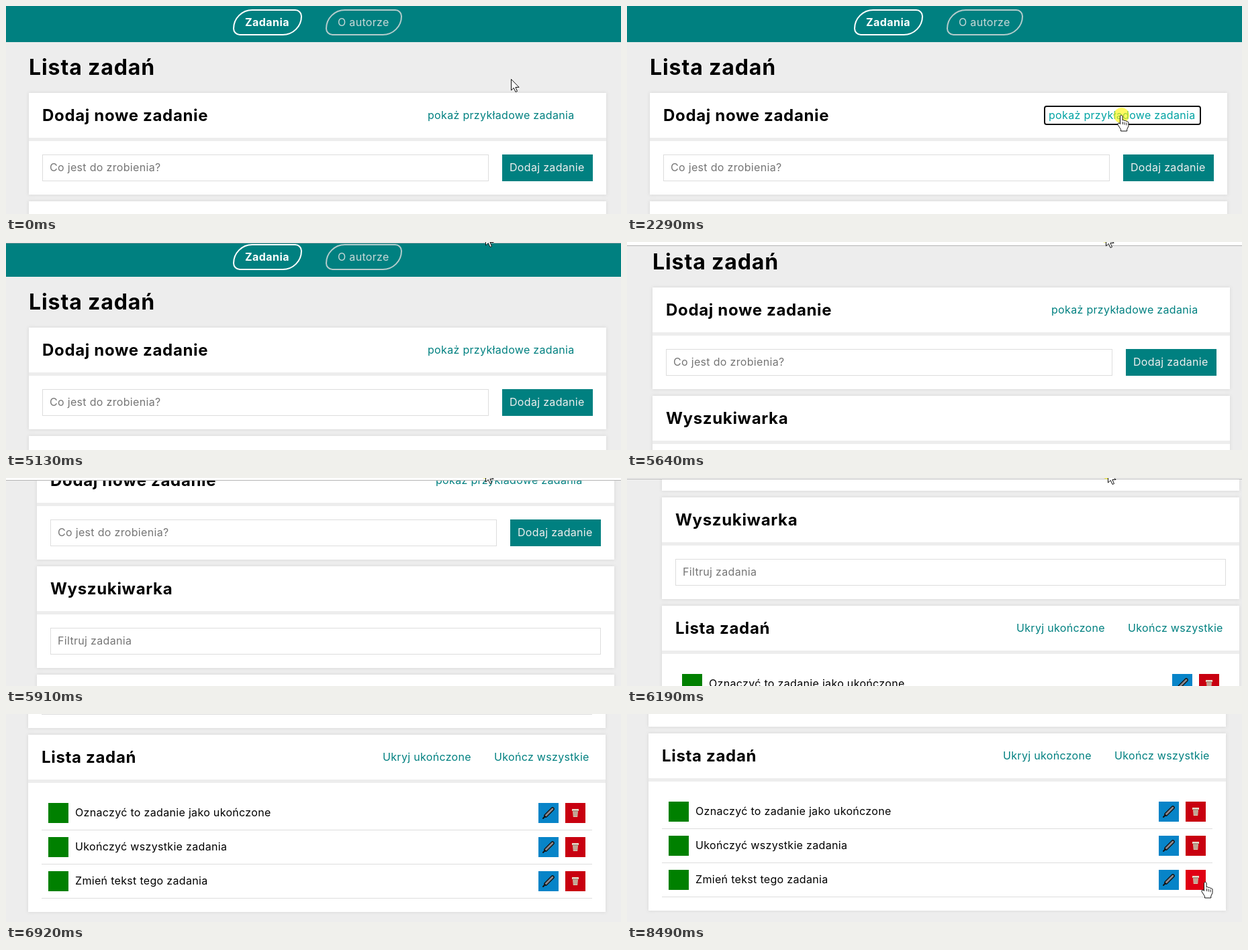
An HTML page with a canvas for the animation above (8.56 s loop, 916 px wide and 311 px high).

```html
<!DOCTYPE html>
<html lang="pl">
<head>
<meta charset="utf-8">
<title>Lista zadań</title>
<style>
  html, body { margin: 0; width: 100%; height: 100%; overflow: hidden; background: #eee; }
  canvas { display: block; }
</style>
</head>
<body>
<canvas id="stage" width="916" height="311"></canvas>
<script>
const ctx = document.getElementById('stage').getContext('2d');
const W = 916, H = 311, LOOP = 8560;
const TEAL = '#008080', BG = '#ededed';

// Recorder activity: [start, end, number of steps]
const BURSTS = [
  [390, 680, 5], [2290, 3120, 12], [3190, 4030, 13], [4100, 4850, 12],
  [5130, 5980, 13], [6040, 6850, 13], [6920, 6920, 1], [7260, 7260, 1], [7860, 8490, 9]
];
// Pointer hotspot: [time, x, y]
const POINTER = [
  [320, 752, 109], [680, 736, 163], [2480, 736, 163], [2800, 734, 112],
  [3120, 730, 42], [3400, 722, 6], [3890, 718, -12], [4850, 716, -14],
  [5130, 714, -12], [5640, 713, -11], [6190, 716, -10], [6520, 716, -13],
  [6850, 716, -14], [6920, 716, -30], [7790, 723, -24], [7860, 726, -8],
  [8050, 752, 60], [8250, 805, 165], [8420, 858, 247], [8490, 861, 251]
];
// Captured region: [time, horizontal shift, scroll, height of the top strip]
const VIEW = [
  [5060, 0, 0, 0], [5200, 0, 4, 4], [5640, 4, 64, 6], [5980, 14, 185, 4],
  [6190, 18, 269, 2], [6520, -1, 379, 3], [6850, -1, 420, 2],
  [6920, -1, 423, 0], [7190, -1, 423, 0], [7260, -2, 425, 0]
];
const TASKS = ['Oznaczyć to zadanie jako ukończone', 'Ukończyć wszystkie zadania', 'Zmień tekst tego zadania'];

function snap(t) {
  let out = 0;
  for (const [start, end, n] of BURSTS) {
    if (t < start) break;
    const dt = n > 1 ? (end - start) / (n - 1) : 0;
    const k = dt ? Math.min(n - 1, Math.floor((t - start) / dt + 1e-6)) : 0;
    out = start + k * dt;
  }
  return out;
}

function sample(keys, t) {
  if (t <= keys[0][0]) return keys[0].slice(1);
  const i = keys.findIndex(k => k[0] > t);
  if (i < 0) return keys[keys.length - 1].slice(1);
  const a = keys[i - 1], b = keys[i], f = (t - a[0]) / (b[0] - a[0]);
  return a.slice(1).map((v, j) => v + (b[j + 1] - v) * f);
}

function rect(x, y, w, h, color) {
  ctx.fillStyle = color;
  ctx.fillRect(x, y, w, h);
}

function text(s, x, y, color = '#000', size = 16, weight = 400) {
  ctx.font = `${weight} ${size}px Inter, sans-serif`;
  ctx.letterSpacing = size * (weight > 400 ? 0.028 : 0.02) + 'px';
  ctx.fillStyle = color;
  ctx.fillText(s, x, y);
}

function roundBox(x, y, w, h, radii, color) {
  ctx.beginPath();
  ctx.roundRect(x + 1, y + 1, w - 2, h - 2, radii);
  ctx.strokeStyle = color;
  ctx.lineWidth = 2;
  ctx.stroke();
}

function panel(y, h, title) {
  ctx.save();
  ctx.shadowColor = '#d4d4d4';
  ctx.shadowBlur = 5;
  rect(34, y, 860, h, '#fff');
  ctx.restore();
  rect(34, y + 67, 860, 5, BG);
  text(title, 54, y + 42, '#000', 24, 700);
}

function field(y, w, hint) {
  ctx.strokeStyle = '#ddd';
  ctx.lineWidth = 1;
  ctx.strokeRect(54.5, y + 0.5, w - 1, 39);
  text(hint, 65, y + 25, '#757575');
}

function pencil(x, y) {
  ctx.lineCap = 'round';
  for (const [color, width] of [['#111', 5.5], ['#8b8990', 2.8]]) {
    ctx.strokeStyle = color;
    ctx.lineWidth = width;
    ctx.beginPath();
    ctx.moveTo(x - 4, y + 4);
    ctx.lineTo(x + 6, y - 6);
    ctx.stroke();
  }
  ctx.strokeStyle = '#111';
  ctx.lineWidth = 2;
  ctx.beginPath();
  ctx.moveTo(x - 8, y + 8);
  ctx.lineTo(x - 5, y + 5);
  ctx.stroke();
  ctx.lineCap = 'butt';
}

function bin(x, y) {
  ctx.beginPath();
  ctx.moveTo(x - 4, y - 4);
  ctx.lineTo(x + 4, y - 4);
  ctx.lineTo(x + 3.2, y + 6);
  ctx.lineTo(x - 3.2, y + 6);
  ctx.closePath();
  ctx.fillStyle = '#dcc8b4';
  ctx.fill();
  rect(x - 5, y - 6, 10, 3, '#e8dccb');
  rect(x - 4, y - 3.5, 8, 1, '#7c5a50');
  for (const d of [-2, 0, 2]) rect(x + d - 0.4, y - 2, 0.8, 7, '#9a7468');
}

function loader(t) {
  roundBox(730, 149, 125, 29, 3, '#111');
  const xs = [743, 760, 777, 796, 810, 823, 839];
  const pos = (((t - 3890) / 140 + 2) % 7 + 7) % 7;
  const lit = Math.floor(pos + 0.01);
  ctx.textAlign = 'center';
  [...'LOADING'].forEach((ch, i) => {
    const d = i - lit;
    const color = d === 0 ? '#f01018' : d === -1 ? '#0b7148' : d === -2 || d === 1 ? '#76569a' : '#34343f';
    const size = 13 * (1 + 0.85 * Math.exp(-1.1 * d * d));
    ctx.save();
    if (d === 0) {
      ctx.shadowColor = '#ff2020';
      ctx.shadowBlur = 12;
    }
    ctx.font = `900 ${size}px Inter, sans-serif`;
    ctx.letterSpacing = '0px';
    ctx.fillStyle = color;
    ctx.fillText(ch, xs[i], 163 + size * 0.36);
    if (Math.abs(d) < 2 && d < 1) {
      ctx.lineWidth = 0.8;
      ctx.strokeStyle = d ? '#123' : '#801018';
      ctx.strokeText(ch, xs[i], 163 + size * 0.36);
    }
    ctx.restore();
  });
  ctx.textAlign = 'left';
}

function header() {
  rect(-20, -20, W + 40, 74, TEAL);
  roundBox(338, 5, 103, 39, [30, 10, 30, 10], '#fff');
  text('Zadania', 356, 30, '#fff', 16, 700);
  roundBox(476, 5, 114, 39, [30, 10, 30, 10], '#b4cccc');
  text('O autorze', 494, 30, '#c8d8d8');
}

function page(t, over) {
  header();
  text('Lista zadań', 34, 103, '#000', 32, 700);

  panel(130, 152, 'Dodaj nowe zadanie');
  const loading = t >= 2420 && t < 4850;
  if (loading) {
    loader(t);
  } else {
    text('pokaż przykładowe zadania', 628, 169, over(624, 150, 228, 28) ? '#00a3a3' : TEAL);
    if (t >= 2290 && t < 5130) roundBox(621, 149, 234, 29, 3, '#111');
  }
  field(222, 665, 'Co jest do zrobienia?');
  rect(739, 222, 135, 40, TEAL);
  text('Dodaj zadanie', 750, 247, '#eee');

  panel(292, 152, 'Wyszukiwarka');
  field(384, 820, 'Filtruj zadania');

  panel(454, 265, 'Lista zadań');
  text('Ukryj ukończone', 562, 493, TEAL);
  text('Ukończ wszystkie', 728, 493, over(724, 474, 148, 28) ? '#00a3a3' : TEAL);
  TASKS.forEach((task, i) => {
    const y = 556 + 51 * i;
    rect(64, y, 30, 30, '#008000');
    text(task, 104, y + 20);
    rect(794, y, 30, 30, over(794, y, 30, 30) ? '#0a98e4' : '#0784c8');
    pencil(809, y + 15);
    rect(834, y, 30, 30, over(834, y, 30, 30) ? '#e00014' : '#c80010');
    bin(849, y + 15);
    rect(54, y + 40, 820, 1, '#ddd');
  });
}

function arrow() {
  ctx.beginPath();
  [[0, 0], [0, 16.5], [3.8, 13], [6.5, 19], [9, 18], [6.4, 12], [11.6, 12]].forEach(p => ctx.lineTo(...p));
}

function hand() {
  ctx.beginPath();
  ctx.moveTo(-2, 13);
  ctx.lineTo(-2, 1);
  ctx.quadraticCurveTo(-0.2, -1.6, 1.6, 1);
  ctx.lineTo(1.6, 7.5);
  for (const [x, y] of [[4.6, 8], [7.6, 9], [10.5, 10.4]]) {
    ctx.quadraticCurveTo(x - 1.5, y - 1.8, x, y);
  }
  ctx.lineTo(10.5, 16);
  ctx.lineTo(8.2, 21);
  ctx.lineTo(8.2, 23.5);
  ctx.lineTo(-1, 23.5);
  ctx.lineTo(-1, 21);
  ctx.lineTo(-5.5, 14);
  ctx.quadraticCurveTo(-5.6, 10.8, -3.4, 11.4);
}

function pointer(x, y, isHand, pressed) {
  ctx.save();
  ctx.translate(x + 0.5, y + 0.5);
  if (pressed) {
    ctx.beginPath();
    ctx.arc(0, 0, 11.5, 0, 7);
    ctx.fillStyle = 'rgba(255, 245, 0, .62)';
    ctx.fill();
  }
  (isHand ? hand : arrow)();
  ctx.closePath();
  ctx.fillStyle = '#fff';
  ctx.fill();
  ctx.strokeStyle = '#111';
  ctx.lineWidth = 1;
  ctx.stroke();
  if (isHand) {
    for (const d of [2, 4.6, 7.4]) rect(d - 0.4, 9 + d / 4, 0.9, 4, '#111');
  }
  ctx.restore();
}

function draw(now) {
  const t = snap(now);
  const [px, py] = sample(POINTER, t).map(Math.round);
  const [dx, scroll, strip] = sample(VIEW, t).map(Math.round);
  let isHand = false;
  const over = (x, y, w, h) => {
    const ox = px - dx - x, oy = py + scroll - y;
    const hit = py >= 0 && ox >= 0 && ox <= w && oy >= 0 && oy <= h;
    isHand = isHand || hit;
    return hit;
  };

  rect(0, 0, W, H, BG);
  ctx.save();
  ctx.translate(dx, -scroll);
  page(t, over);
  ctx.restore();
  if (strip) {
    rect(0, 0, W, strip - 1, '#fff');
    rect(0, strip - 1, W, 1, '#b4b4b4');
  }
  const pressed = (t >= 2290 && t < 2420) || (t >= 5130 && t <= 6850);
  pointer(px, py, isHand, pressed);
}

const begin = performance.now();
function tick() {
  draw((performance.now() - begin) % LOOP);
  requestAnimationFrame(tick);
}
tick();
</script>
</body>
</html>
```
